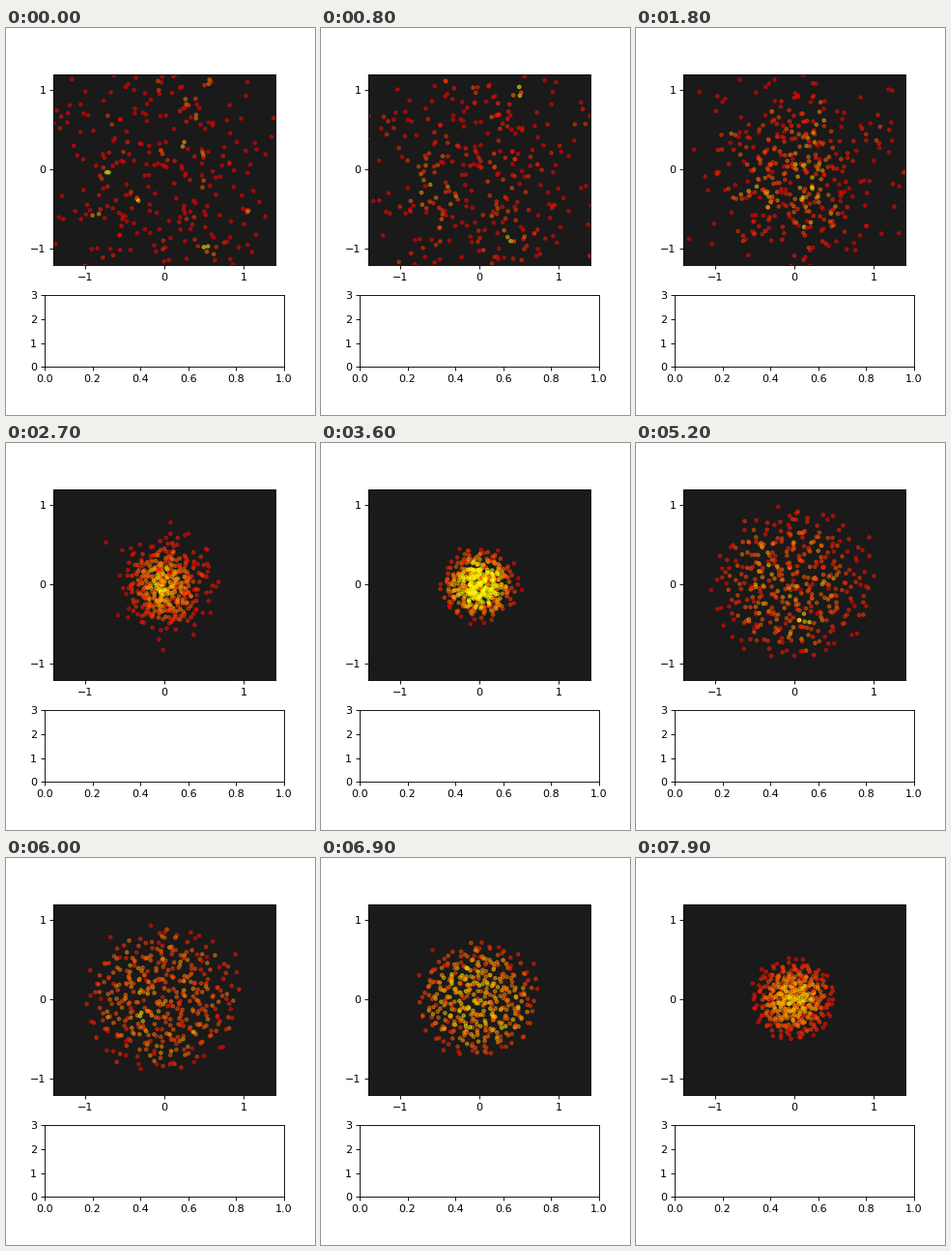
Animation, 320 px wide and 400 px high, one loop 8 s. Source, as a matplotlib script:

```python
import math

import matplotlib.pyplot as plt
import numpy as np
from matplotlib.animation import FuncAnimation

# Smoothed-particle simulation of a star settling under its own gravity
N, FRAMES, DT = 400, 80, 0.04
MASS, RADIUS = 2, 0.75
H = 0.1             # smoothing length
K, POLY = 0.1, 1    # equation of state: P = K * rho^(1 + 1/POLY)
NU = 1              # damping
LAM = (2 * K * (1 + POLY) * math.pi ** (-3 / (2 * POLY))
       * (MASS * math.gamma(2.5 + POLY) / RADIUS**3
          / math.gamma(1 + POLY)) ** (1 / POLY) / RADIUS**2)
M = MASS / N


def forces(pos, vel):
    """Acceleration and density of every particle."""
    diff = pos[:, None, :] - pos[None, :, :]
    w = np.exp(-(diff**2).sum(axis=2) / H**2) / (H * math.sqrt(math.pi)) ** 3
    rho = M * w.sum(axis=1)
    q = K * rho ** (1 + 1 / POLY) / rho**2
    pull = M * (q[:, None] + q[None, :]) * (-2 / H**2) * w
    acc = -(pull[:, :, None] * diff).sum(axis=1)
    return acc - LAM * pos - NU * vel, rho


def simulate():
    np.random.seed(42)
    pos = np.random.randn(N, 3)
    vel = np.zeros_like(pos)
    acc, _ = forces(pos, vel)
    states = []
    for _ in range(FRAMES):
        vel += acc * DT / 2
        pos += vel * DT
        acc, rho = forces(pos, vel)
        vel += acc * DT / 2
        states.append((pos[:, :2].copy(), np.minimum((rho - 3) / 3, 1)))
    return states


states = simulate()

fig = plt.figure(figsize=(4, 5), dpi=80)
grid = plt.GridSpec(3, 1, wspace=0.0, hspace=0.3)

ax1 = fig.add_subplot(grid[0:2, 0])
ax1.set(xlim=(-1.4, 1.4), ylim=(-1.2, 1.2),
        xticks=[-1, 0, 1], yticks=[-1, 0, 1])
ax1.set_aspect("equal", "box")
ax1.set_facecolor((0.1, 0.1, 0.1))

ax2 = fig.add_subplot(grid[2, 0])
ax2.set(xlim=(0, 1), ylim=(0, 3))
ax2.set_aspect(0.1)

dots = ax1.scatter(*states[0][0].T, c=states[0][1], cmap="autumn",
                   s=10, alpha=0.5)


def update(i):
    pos, heat = states[i]
    dots.set_offsets(pos)
    dots.set_array(heat)
    dots.set_clim(heat.min(), heat.max())
    return (dots,)


anim = FuncAnimation(fig, update, frames=FRAMES, interval=100, repeat=True,
                     repeat_delay=0, init_func=lambda: update(0))

plt.show()
```
